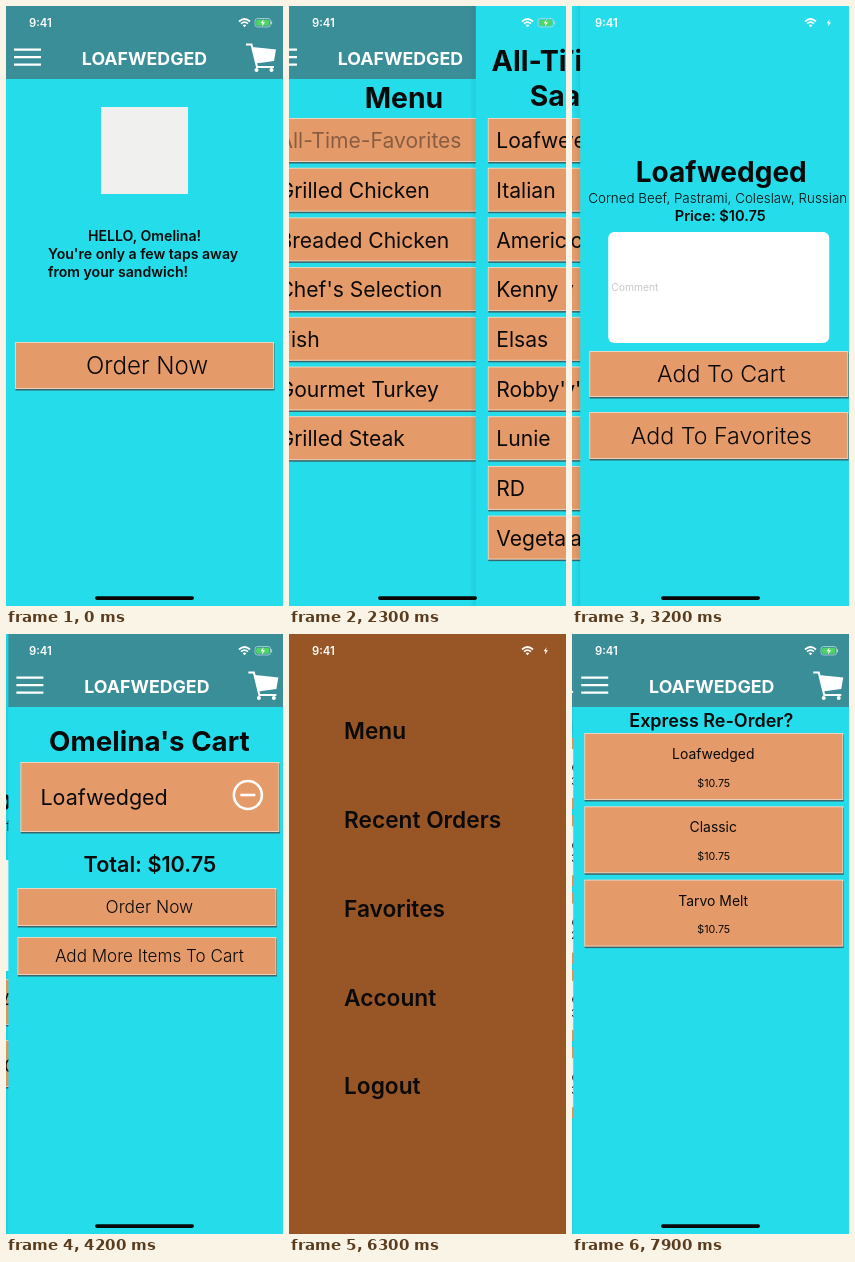
An HTML page for the animation above (8 s loop, 277 by 600 pixels).

```html
<!DOCTYPE html>
<html lang="en">
<head>
<meta charset="utf-8">
<title>Sandwich ordering app</title>
<style>
  html, body { margin: 0; width: 100%; height: 100%; overflow: hidden; background: #24dcea; }
  svg { display: block; width: 277px; height: 600px; font-family: Inter, sans-serif; }
</style>
</head>
<body>
<svg id="stage" viewBox="0 0 277 600"></svg>
<script>
const W = 277, LOOP = 8000, SLIDE = 500;
const CYAN = '#24dcea', TEAL = '#398e98', CRUST = '#e59a69', BROWN = '#985525';
const BRAND = 'LOAFWEDGED', ITEM = 'Loafwedged', USER = 'Omelina';

// y is the middle of the capitals
const text = (x, y, str, size, weight = 400, anchor = 'middle', fill = '#0a0a0a') =>
  `<text x="${x}" y="${y + size * 0.364}" font-size="${size}" font-weight="${weight}" text-anchor="${anchor}" fill="${fill}">${str}</text>`;
const rect = (x, y, w, h, fill, extra = '') =>
  `<rect x="${x}" y="${y}" width="${w}" height="${h}" fill="${fill}" ${extra}/>`;
const tap = content => `<g class="tap">${content}</g>`;

const button = (x, y, w, h, label) =>
  rect(x + 0.5, y + 1.5, w, h, '#3d4a4a', 'opacity=".8"') +
  rect(x + 0.5, y + 0.5, w - 1, h - 1, CRUST, 'stroke="#f5d9c4" stroke-width=".9"') + tap(label);

const wide = (y, h, label, size) => button(9, y, 259, h, text(141, y + h / 2, label, size, 300));

const rows = (labels, x) => labels.map((label, i) => {
  const y = 112 + i * 49.7;
  return button(12, y, 258, 44, text(x, y + 22.5, label, 21.1, 400, 'start'));
}).join('');

const header = rect(0, 0, W, 73, TEAL) +
  tap('<path d="M8 43.700h27M8 51.200h27M8 58.700h27" stroke="#fff" stroke-width="2.3"/>') +
  text(138.5, 53, BRAND, 17.8, 700, 'middle', '#fff') +
  `<path d="M240 38.5h5.5l5.5 22.5h17" fill="none" stroke="#fff" stroke-width="2"/>
   <path d="M246 41l24 2.5-2 11.5-18.5 2.5z" fill="#fff"/>
   <circle cx="250.5" cy="64" r="2" fill="#fff"/><circle cx="265.5" cy="64" r="2" fill="#fff"/>`;

const order = (date, price, i) => {
  const y = 104 + i * 77.3;
  return rect(28, y, 222, 71, CRUST) + tap(
    rect(39, y + 11, 200, 49, '#fff') +
    text(50, y + 29, 'Ordered At: ' + date, 12, 400, 'start', '#222') +
    text(50, y + 43, 'Price: ' + price, 10.6, 400, 'start', '#222') +
    `<path d="M224 ${y + 31}l4 4-4 4" fill="none" stroke="#c4c4c8" stroke-width="1.2"/>`);
};

const reorder = (name, i) => {
  const y = 99 + i * 73.3;
  return button(11, y, 259, 67, text(140, y + 21, name, 13.9) + text(140.5, y + 50, '$10.75', 10.7));
};

// Screens in the order they are pushed; start is when the slide begins
const screens = [
  { start: -SLIDE, bar: true, body:
    rect(95, 101, 87, 87, '#f0f0ee') +
    text(138.5, 230, `HELLO, ${USER}!`, 14.1, 600) +
    text(42, 248, "You're only a few taps away", 14.1, 600, 'start') +
    text(42, 265.5, 'from your sandwich!', 14.1, 600, 'start') +
    wide(336, 47, 'Order Now', 24.1) },
  { start: 1350, bar: true, body:
    text(142, 92, 'Menu', 28.3, 700) +
    rows(['All-Time-Favorites', 'Grilled Chicken', 'Breaded Chicken', "Chef's Selection",
      'Fish', 'Gourmet Turkey', 'Grilled Steak'], 16.5) },
  { start: 2253, body:
    text(138.5, 55, 'All-Time-Favorite', 28.7, 700) + text(138.5, 90, 'Sandwiches', 28.3, 700) +
    rows([ITEM, 'Italian', 'American', 'Kenny', 'Elsas', "Robby's", 'Lunie', 'RD', 'Vegetarian'], 20.5) },
  { start: 2925, body:
    text(141, 166, ITEM, 28, 700) +
    text(8, 192, 'Corned Beef, Pastrami, Coleslaw, Russian Dressing', 13.4, 300, 'start') +
    text(140, 210, 'Price: $10.75', 14.6, 600) +
    rect(28, 226, 221, 111, '#fff', 'rx="6"') +
    text(31, 281, 'Comment', 10.3, 400, 'start', '#c8c8cc') +
    wide(345, 46, 'Add To Cart', 23.2) + wide(406, 47, 'Add To Favorites', 23.2) },
  { start: 3845, bar: true, body:
    text(141, 107, USER + "'s Cart", 27.7, 700) +
    button(12, 128, 259, 70, text(32, 163, ITEM, 21.5, 400, 'start')) +
    '<g fill="none" stroke="#fff" stroke-width="2.6"><circle cx="239.5" cy="161" r="14"/><path d="M232 161h15"/></g>' +
    text(141.5, 230, 'Total: $10.75', 21.6, 600) +
    wide(254, 38, 'Order Now', 17.3) + wide(303, 38, 'Add More Items To Cart', 17.1) },
  { start: 5055, fill: BROWN, body:
    ['Menu', 'Recent Orders', 'Favorites', 'Account', 'Logout']
      .map((label, i) => tap(text(55, 97 + i * 88.75, label, 22.7, 600, 'start'))).join('') },
  { start: 6520, bar: true, body:
    text(138.5, 88, USER + "'s Recent Orders", 20.8, 600) +
    [['2019-12-17', '32.25'], ['2019-12-17', '32.25'], ['2019-12-17', '21.50'],
      ['2019-12-17', '32.25'], ['2019-12-16', '32.25']].map(([d, p], i) => order(d, p, i)).join('') },
  { start: 7505, bar: true, body:
    text(138, 86, 'Express Re-Order?', 18, 600) +
    [ITEM, 'Classic', 'Tarvo Melt'].map(reorder).join('') }
];

// [screen, tappable item, from, to]
const presses = [[0, 1, 780, 1110], [1, 1, 2100, 2410], [2, 0, 2840, 3080], [3, 0, 3820, 4060],
  [4, 0, 5020, 5270], [5, 1, 6310, 6580], [6, 1, 7380, 7620]];

const stage = document.getElementById('stage');
stage.innerHTML =
  `<defs><linearGradient id="shade"><stop stop-opacity="0"/><stop offset="1" stop-opacity=".07"/></linearGradient></defs>` +
  screens.map(s => `<g class="screen">${rect(-6, 0, 6, 600, 'url(#shade)')}${rect(0, 0, W, 600, s.fill || CYAN)}${s.bar ? header : ''}${s.body}</g>`).join('') +
  text(23, 17, '9:41', 11.3, 600, 'start', '#fff') +
  `<g fill="none" stroke="#fff" stroke-width="1.7"><path d="M233 15.5q5.5-5 11 0M235 17.7q3.5-3 7 0"/></g>
   <path d="M236.7 19.3q1.8-1.5 3.6 0l-1.8 1.9z" fill="#fff"/>
   <g id="battery"><rect x="249" y="12.5" width="15.5" height="8.5" rx="2.5" fill="none" stroke="#b5d8dc" stroke-width=".8"/>
   <rect x="250.2" y="13.7" width="13.1" height="6.1" rx="1.5" fill="#4fd566"/><path d="M265.6 15.3v3" stroke="#b5d8dc"/></g>
   <path d="M257.6 13.3l-3 4h2l-.6 3.2 3-4.2h-2z" fill="#fff"/>` +
  rect(89, 590.3, 99, 3.6, '#080808', 'id="homeBar" rx="1.8"');

const groups = [...stage.querySelectorAll('.screen')];
const taps = groups.map(g => g.querySelectorAll('.tap'));
const battery = document.getElementById('battery');
const homeBar = document.getElementById('homeBar');
const clamp = v => Math.max(0, Math.min(1, v));
const show = (el, on) => el.setAttribute('visibility', on ? 'visible' : 'hidden');

// cubic-bezier(.2833, .99, .31833, .99)
function ease(x) {
  if (x <= 0 || x >= 1) return clamp(x);
  const curve = (s, a, b) => 3 * (1 - s) ** 2 * s * a + 3 * (1 - s) * s * s * b + s ** 3;
  let lo = 0, hi = 1;
  for (let i = 0; i < 24; i++) {
    const mid = (lo + hi) / 2;
    if (curve(mid, 0.2833, 0.31833) < x) lo = mid; else hi = mid;
  }
  return curve(lo, 0.99, 0.99);
}

function draw(t) {
  const entered = screens.map(s => ease((t - s.start) / SLIDE));
  const visible = [];
  groups.forEach((g, i) => {
    const left = entered[i + 1] || 0;
    const on = entered[i] > 0 && left < 1;
    show(g, on);
    if (on) visible.push(screens[i]);
    g.setAttribute('transform', `translate(${W * (1 - entered[i]) - 0.3 * W * left} 0)`);
  });
  for (const [screen, item, from, to] of presses) {
    const held = clamp(Math.min((t - from) / 120, (to - t) / 150));
    taps[screen][item].setAttribute('opacity', 1 - 0.8 * held);
  }
  show(battery, visible.some(s => s.bar));
  show(homeBar, visible.some(s => s.fill !== BROWN));
}

const begin = performance.now();
function tick() {
  draw((performance.now() - begin) % LOOP);
  requestAnimationFrame(tick);
}
tick();
</script>
</body>
</html>
```
